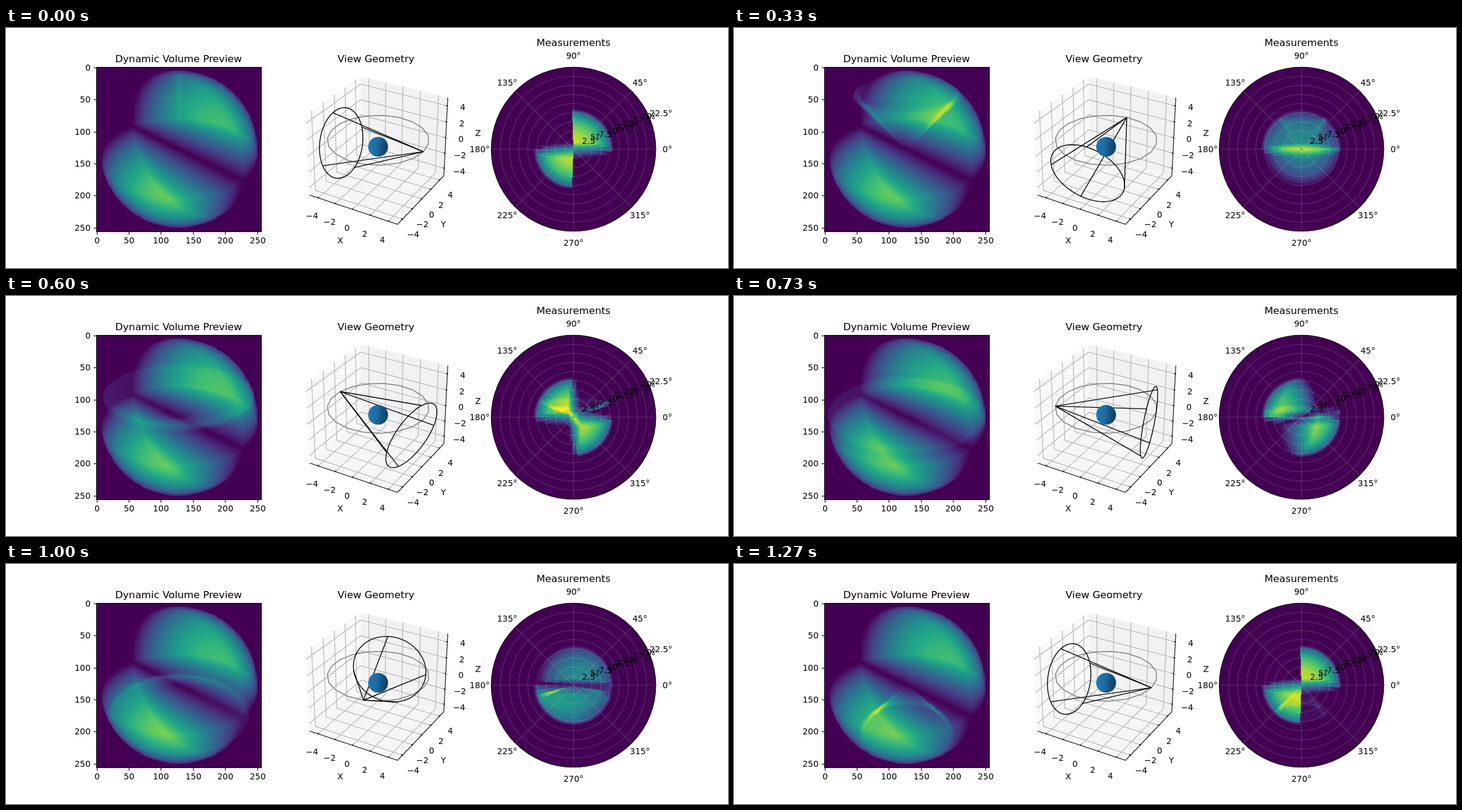
Recreate the animation shown at these times as an HTML page with a canvas. Size 1200x400 px, loop 1.34 s.

```html
<!DOCTYPE html>
<html lang="en">
<head>
<meta charset="utf-8">
<title>Volume preview</title>
<style>
html, body { margin: 0; height: 100%; overflow: hidden; background: #fff; }
canvas { display: block; }
</style>
</head>
<body>
<canvas id="stage" width="1200" height="400"></canvas>
<script>
const ctx = document.getElementById('stage').getContext('2d');
const { PI, sin, cos, tan, sqrt, min, max, round, floor, hypot, atan2 } = Math;
const STEPS = 20, LOOP = 1340, DEG = PI / 180, CELL = 3.6 * DEG;
const TILT = Math.atan(1 / 5), ORBIT = hypot(5, 1), ARC = 2 * PI / 49;
const HALF = 136.75, MID_Y = 202, POLAR_X = 943.25, MAX_ANGLE = 22.5;

// ---- colour map (viridis) ----
const STOPS = [[68, 1, 84], [72, 36, 117], [65, 68, 135], [53, 95, 141], [42, 120, 142], [33, 145, 140],
  [34, 168, 132], [68, 191, 112], [122, 209, 81], [189, 223, 38], [253, 231, 37]];
const palette = Uint32Array.from({ length: 256 }, (_, n) => {
  const p = n / 25.5, k = min(9, floor(p));
  const [r, g, b] = STOPS[k].map((v, c) => round(v + (STOPS[k + 1][c] - v) * (p - k)));
  return (255 << 24 | b << 16 | g << 8 | r) >>> 0;
});

// ---- ray casting through the unit ball ----
function basis(az, el) {
  const ca = cos(az), sa = sin(az), ce = cos(el), se = sin(el);
  return { out: [ce * ca, ce * sa, se], right: [-sa, ca, 0], up: [-se * ca, -se * sa, ce] };
}

// Length of the chord inside the two quarter wedges where y and z share a sign.
function wedgeLength(y, dy, z, dz, h) {
  const clamp = s => max(-h, min(h, s));
  const a = clamp(-y / (dy || 1e-9)), b = clamp(-z / (dz || 1e-9));
  const cuts = [-h, min(a, b), max(a, b), h];
  let sum = 0;
  for (let k = 0; k < 3; k++) {
    const m = (cuts[k] + cuts[k + 1]) / 2;
    if ((y + dy * m) * (z + dz * m) > 0) sum += cuts[k + 1] - cuts[k];
  }
  return sum;
}

// Length of the chord inside the cone z > c|p|.
function coneLength(z, dz, near2, h, c) {
  if (c < 0) return 2 * h - coneLength(-z, -dz, near2, h, -c);
  const A = dz * dz - c * c, H = z * dz, disc = H * H - A * (z * z - c * c * near2);
  if (disc <= 0) return 0;
  const q = sqrt(disc), s1 = (-H - q) / A, s2 = (-H + q) / A;
  let lo = s2, hi = s1;
  if (A < 0) {
    if (z + dz * (lo + hi) / 2 < 0) return 0;
  } else if (dz > 0) hi = h;
  else lo = -h;
  return max(0, min(h, hi) - max(-h, lo));
}

function castRays(size, { out, right, up }, dist, aim) {
  const rays = [];
  for (let i = 0; i < size * size; i++) {
    const slope = aim(i % size + 0.5 - size / 2, size / 2 - 0.5 - floor(i / size));
    if (!slope) continue;
    const [a, b] = slope, n = hypot(a, b, 1), s = dist / n, near2 = dist * dist - s * s;
    if (near2 >= 1) continue;
    const dir = k => (a * right[k] + b * up[k] - out[k]) / n;
    const dy = dir(1), dz = dir(2), y = dist * out[1] + s * dy, z = dist * out[2] + s * dz;
    const h = sqrt(1 - near2);
    rays.push({ i, z, dz, near2, h, wedge: wedgeLength(y, dy, z, dz, h) });
  }
  return rays;
}

function paint(size, rays, step, peak) {
  const canvas = document.createElement('canvas');
  canvas.width = canvas.height = size;
  const c = canvas.getContext('2d'), img = c.createImageData(size, size);
  const px = new Uint32Array(img.data.buffer);
  const inner = cos(2 * step * CELL), outer = cos((2 * step + 1) * CELL);
  for (const { i, z, dz, near2, h, wedge } of rays) {
    const shell = coneLength(z, dz, near2, h, outer) - coneLength(z, dz, near2, h, inner);
    px[i] = palette[min(255, floor((wedge + shell) / peak * 256))];
  }
  c.putImageData(img, 0, 0);
  return canvas;
}

const previewRays = castRays(256, basis(-45 * DEG, 30 * DEG), 3.73, (x, y) => [x / 440, y / 440]);
const satellite = step => basis(2 * PI * step / (STEPS - 1), TILT);

function polarAim(x, y) {
  const dr = MAX_ANGLE / 49;
  const ring = round(hypot(x, y) / HALF * MAX_ANGLE / dr);
  if (!ring) return null;
  const angle = (atan2(y, x) + 2 * PI) % (2 * PI);
  const t = tan(ring * dr * DEG), a = round(angle / ARC) * ARC;
  return [t * cos(a), t * sin(a)];
}

const cache = [];
const images = step => cache[step] ||= {
  preview: paint(256, previewRays, step, 1.97),
  polar: paint(142, castRays(142, satellite(step), 5.4, polarAim), step, 2.15),
};

// ---- drawing helpers ----
function text(str, x, y, align = 'center', size = 13.89) {
  ctx.font = `${size}px "DejaVu Sans", sans-serif`;
  ctx.textAlign = align;
  ctx.fillStyle = '#000';
  ctx.fillText(str, x, round(y));
}
const title = (str, x, y) => text(str, x, y, 'center', 16.67);
const signed = v => String(v).replace('-', '\u2212');

function path(points, stroke, width = 1.11, fill) {
  ctx.beginPath();
  points.forEach(([x, y]) => ctx.lineTo(x, y));
  if (fill) { ctx.fillStyle = fill; ctx.fill(); }
  if (stroke) { ctx.strokeStyle = stroke; ctx.lineWidth = width; ctx.stroke(); }
}

function circle(x, y, r) {
  ctx.beginPath();
  ctx.arc(x, y, r, 0, 2 * PI);
}

function project([x, y, z]) {
  const side = (0.866 * x + 0.5 * y) * 16.8, front = (0.5 * x - 0.866 * y) * 16.8, h = z * 15.2;
  const f = 1 / (1 - (0.866 * front + 0.5 * h) / 1290);
  return [618.5 + side * f, 198 - (0.866 * h - 0.5 * front) * f];
}
const path3 = (points, ...style) => path(points.map(project), ...style);

// ---- panels ----
function drawPreview(step) {
  const x0 = 150, y0 = 65, size = 274;
  ctx.fillStyle = '#440154';
  ctx.fillRect(x0, y0, size, size);
  ctx.imageSmoothingEnabled = false;
  ctx.drawImage(images(step).preview, x0, y0, size, size);
  ctx.strokeStyle = '#000';
  ctx.lineWidth = 1.11;
  ctx.strokeRect(x0 + 0.5, y0 + 0.5, size, size);
  for (let v = 0; v <= 250; v += 50) {
    const d = (v + 0.5) * 2 * HALF / 256;
    const x = round(150 + d) + 0.5, y = round(MID_Y - HALF + d) + 0.5;
    path([[x, 339.5], [x, 344.5]], '#000');
    path([[150.5, y], [145.5, y]], '#000');
    text(v, x, 359);
    text(v, 140.5, y + 4.6, 'right');
  }
  title('Dynamic Volume Preview', 286.8, 57);
}

function drawAxes3d() {
  path3([[-5, -5, -5], [-5, 5, -5], [-5, 5, 5], [-5, -5, 5]], null, 0, '#f9f9f9');
  path3([[-5, 5, -5], [5, 5, -5], [5, 5, 5], [-5, 5, 5]], null, 0, '#f2f2f2');
  path3([[-5, -5, -5], [5, -5, -5], [5, 5, -5], [-5, 5, -5]], null, 0, '#f6f6f6');
  for (let v = -4; v <= 4; v += 2) {
    path3([[v, -5, -5], [v, 5, -5], [v, 5, 5]], '#b0b0b0');
    path3([[5, v, -5], [-5, v, -5], [-5, v, 5]], '#b0b0b0');
    path3([[-5, -5, v], [-5, 5, v], [5, 5, v]], '#b0b0b0');
  }
  path3([[-5, -5, -5], [5, -5, -5]], '#000');
  path3([[5, -5, -5], [5, 5, -5]], '#000');
  path3([[5, 5, -5], [5, 5, 5]], '#000');
  for (let v = -4; v <= 4; v += 2) {
    path3([[v, -5.08, -5], [v, -4.83, -5]], '#000');
    path3([[5.08, v, -5], [4.83, v, -5]], '#000');
    path3([[5.08, 5, v], [4.83, 5, v]], '#000');
    const s = signed(v);
    text(s, 567 + v * 14.6, 338 + v * 5);
    text(s, 707.5 + v * 7.7, 316 - v * 8.2);
    text(s, 756.2 + v * 0.75, 190.4 - v * 13.3);
  }
  text('X', 555.5, 359);
  text('Y', 727, 332);
  text('Z', 784.5, 180);
}

function drawSphere() {
  const [x, y] = project([0, 0, 0]), shade = ctx.createLinearGradient(x - 16, y - 2, x + 16, y + 2);
  shade.addColorStop(0, '#1f77b4');
  shade.addColorStop(0.4, '#1c6da4');
  shade.addColorStop(1, '#103c5b');
  circle(x, y, 16.5);
  ctx.fillStyle = shade;
  ctx.fill();
}

function drawGeometry(step) {
  drawAxes3d();
  const orbit = Array.from({ length: STEPS }, (_, k) => satellite(k).out.map(v => v * ORBIT));
  path3(orbit, '#808080', 1.5);

  const { out, right, up } = satellite(step), reach = 2 * ORBIT;
  const spread = reach * sin(MAX_ANGLE * DEG), base = ORBIT - reach * cos(MAX_ANGLE * DEG);
  const rim = Array.from({ length: 50 }, (_, k) =>
    out.map((v, j) => v * base + spread * (right[j] * cos(k * ARC) + up[j] * sin(k * ARC))));
  for (let k = 0; k < 50; k += 13) path3([orbit[step], rim[k]], '#000', 1.39);
  path3(rim, '#000', 1.39);
  drawSphere();
  title('View Geometry', 615, 57);
}

function drawMeasurements(step) {
  const grid = 'rgba(176,176,176,0.25)', at = (r, a) => [POLAR_X + r * cos(a), MID_Y - r * sin(a)];
  circle(POLAR_X, MID_Y, HALF);
  ctx.fillStyle = '#440154';
  ctx.fill();
  ctx.drawImage(images(step).polar, 872, 131);
  ctx.lineWidth = 1.11;
  ctx.strokeStyle = grid;
  for (let r = 2.5; r < MAX_ANGLE; r += 2.5) {
    circle(POLAR_X, MID_Y, r / MAX_ANGLE * HALF);
    ctx.stroke();
  }
  for (let a = 0; a < 360; a += 45) {
    path([at(0, 0), at(HALF, a * DEG)], grid);
    const [x, y] = at(156, a * DEG);
    text(a + '°', x, y + 4.6);
  }
  circle(POLAR_X, MID_Y, HALF);
  ctx.strokeStyle = '#000';
  ctx.stroke();
  for (let r = 2.5; r <= MAX_ANGLE; r += 2.5) {
    const [x, y] = at(r / MAX_ANGLE * HALF, 22.5 * DEG);
    text(r + '°', x, y - 3, 'left');
  }
  title('Measurements', 943.2, 30);
}

function draw() {
  const t = floor(performance.now() % LOOP / 10) * 10;
  const step = min(STEPS - 1, floor((t + 4) * 3 / 200));
  ctx.fillStyle = '#fff';
  ctx.fillRect(0, 0, 1200, 400);
  drawPreview(step);
  drawGeometry(step);
  drawMeasurements(step);
  requestAnimationFrame(draw);
}
draw();
</script>
</body>
</html>
```
